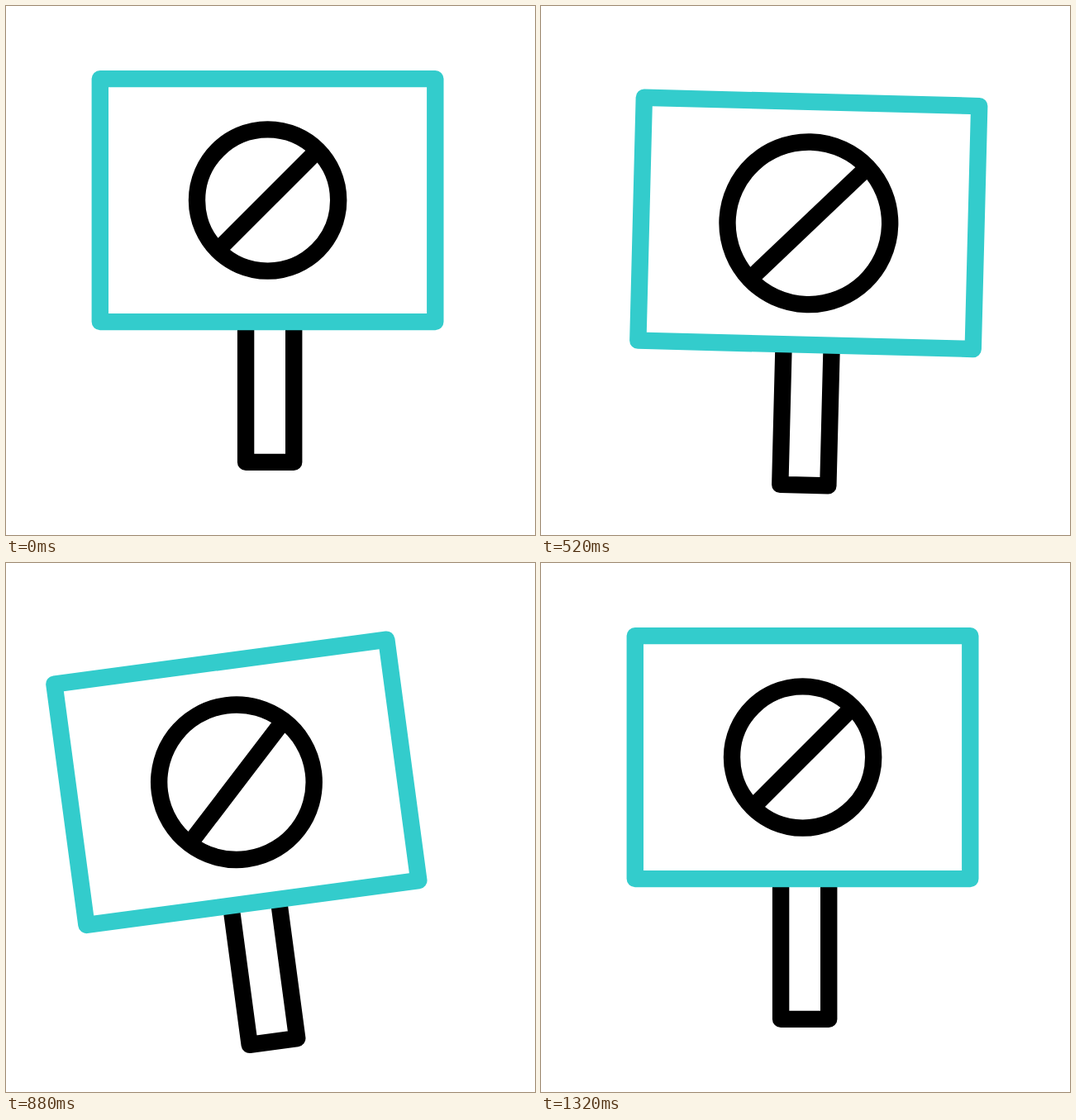
These frames come from a looping animation (640x640 px, 1360 ms). An HTML page without scripts:

```html
<!DOCTYPE html>
<html lang="en">
<head>
<meta charset="utf-8">
<title>Protest sign</title>
<style>
  @property --tick { syntax: "<number>"; inherits: true; initial-value: 0; }

  html, body { margin: 0; width: 100%; height: 100%; overflow: hidden; background: #fff; }
  svg { display: block; width: 100%; height: 100%; }

  /* 34 ticks of 40 ms */
  .stage { animation: tick 1360ms steps(34) -1ms infinite; }
  @keyframes tick { from { --tick: 0; } to { --tick: 34; } }

  .sign {
    /* linear ramps from 0 to 1: (tick - start) / length */
    --left1: clamp(0, (var(--tick) - 1) / 6.3, 1);
    --right: clamp(0, (var(--tick) - 8.3) / 7, 1);
    --left2: clamp(0, (var(--tick) - 16.34) / 6.39, 1);
    --rest: clamp(0, (var(--tick) - 24.06) / 6.9, 1);
    --down: clamp(0, (var(--tick) - 3) / 13, 1);
    --up: clamp(0, (var(--tick) - 19.5) / 10.9, 1);
    --grow: clamp(0, (var(--tick) - 5.45) / 9.1, 1);
    --shrink: clamp(0, (var(--tick) - 17) / 11.4, 1);

    /* each ramp eased as u * u * (3 - 2u) */
    --angle: calc(
      -9deg * var(--left1) * var(--left1) * (3 - 2 * var(--left1))
      + 14deg * var(--right) * var(--right) * (3 - 2 * var(--right))
      - 13.1deg * var(--left2) * var(--left2) * (3 - 2 * var(--left2))
      + 8.1deg * var(--rest) * var(--rest) * (3 - 2 * var(--rest)));
    --drop: calc(32px * (
      var(--down) * var(--down) * (3 - 2 * var(--down))
      - var(--up) * var(--up) * (3 - 2 * var(--up))));
    --radius: calc(85.6px + 13.8px * (
      var(--grow) * var(--grow) * (3 - 2 * var(--grow))
      - var(--shrink) * var(--shrink) * (3 - 2 * var(--shrink))));

    transform-origin: 316.5px 519px;
    transform: translateY(var(--drop)) rotate(var(--angle));
    fill: none;
    stroke: #000;
    stroke-width: 20.4px;
    stroke-linejoin: round;
  }
  .board { stroke: #33cccc; }
  .ring { r: var(--radius); }
  .bar { x: calc(-1 * var(--radius)); width: calc(2 * var(--radius)); fill: #000; stroke: none; }
</style>
</head>
<body>
<svg class="stage" viewBox="0 0 640 640">
  <g class="sign">
    <path d="M290.1 384V551.9H348.2V384"/>
    <rect class="board" x="113.8" y="88.1" width="405.5" height="294"/>
    <g transform="translate(316.6 235) rotate(-45)">
      <circle class="ring" r="85.6"/>
      <rect class="bar" x="-85.6" y="-10.2" width="171.2" height="20.4"/>
    </g>
  </g>
</svg>
</body>
</html>
```
